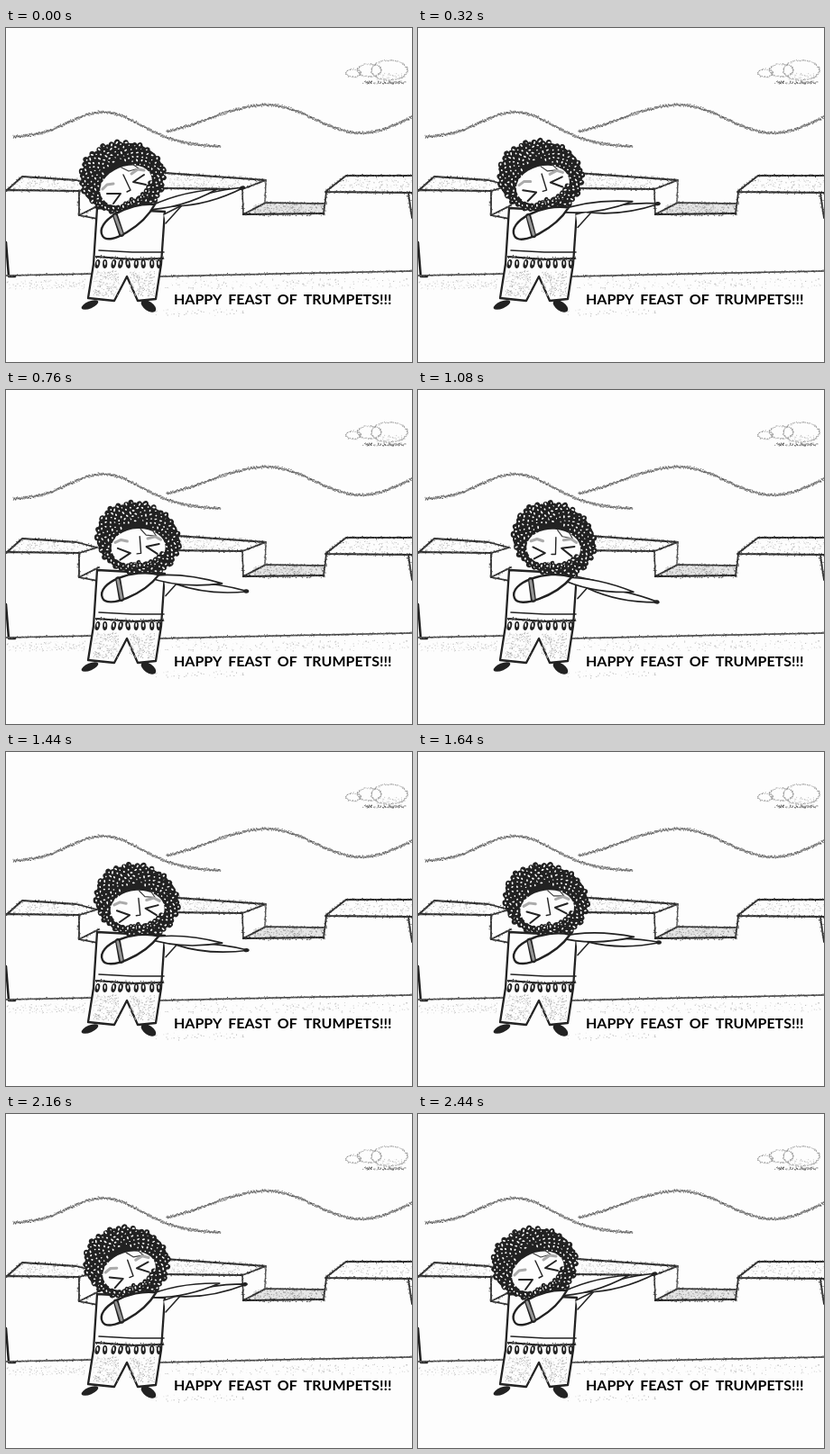
These frames come from a looping animation (450x371 px, 4360 ms). An HTML page with a canvas:

```html
<!DOCTYPE html>
<html lang="en">
<head>
<meta charset="utf-8">
<title>Happy Feast of Trumpets</title>
<style>
html, body { margin: 0; width: 100%; height: 100%; overflow: hidden; background: #fdfdfd; }
canvas { display: block; }
</style>
</head>
<body>
<canvas id="stage" width="450" height="371"></canvas>
<script>
const ctx = document.getElementById('stage').getContext('2d');
const PAPER = '#fdfdfd', DARK = '#222', TAU = Math.PI * 2;
const LOOP = 4360, STEP = 40, REST = 40, PEAK = 1000, END = 2440, SWING = 28;
let seed;

function rnd() {
  seed = (seed * 1664525 + 1013904223) >>> 0;
  return seed / 4294967296;
}
const spread = r => (rnd() - rnd()) * r;
const gray = v => `rgb(${v},${v},${v})`;

function speck(x, y, v) {
  ctx.fillStyle = gray(v + rnd() * 80 | 0);
  ctx.fillRect(x - .5, y - .5, 1, 1);
}

// Line through x,y pairs, optionally filled.
function ink(p, w = 1.6, v = 35, fill) {
  ctx.beginPath();
  for (let i = 0; i < p.length; i += 2) ctx.lineTo(p[i], p[i + 1]);
  if (fill) { ctx.fillStyle = fill; ctx.fill(); }
  ctx.lineWidth = w;
  ctx.strokeStyle = gray(v);
  ctx.stroke();
}

// Dark line with a rough edge.
function pencil(p, w = 2.2, v = 40) {
  ink(p, w * .8, v);
  for (let i = 2; i < p.length; i += 2) {
    const dx = p[i] - p[i - 2], dy = p[i + 1] - p[i - 1], n = Math.hypot(dx, dy);
    for (let j = 0; j < n; j++) {
      speck(p[i - 2] + dx * j / n + spread(w), p[i - 1] + dy * j / n + spread(w), v);
    }
  }
}

function ridge(x0, x1, height) {
  for (let x = x0; x < x1; x += .3) speck(x, height(x) + spread(2), 70);
}

function oval(x, y, rx, ry, a, fill) {
  ctx.beginPath();
  ctx.ellipse(x, y, rx, ry, a, 0, TAU);
  ctx.fillStyle = fill;
  ctx.fill();
}

// Grainy shading inside a box.
function shade(x, y, w, h, n, v = 170) {
  while (n--) speck(x + rnd() * w, y + rnd() * h, v);
}

// Leaf between two points; lead moves the fullest part, up and down set its sides.
function leaf(x1, y1, x2, y2, up, down, lead, w) {
  const n = Math.hypot(x2 - x1, y2 - y1);
  ctx.save();
  ctx.translate(x1, y1);
  ctx.rotate(Math.atan2(y2 - y1, x2 - x1));
  ctx.beginPath();
  ctx.moveTo(0, 0);
  ctx.bezierCurveTo(lead * n, -up, .65 * n, -up, n, 0);
  ctx.bezierCurveTo(.65 * n, down, lead * n, down, 0, 0);
  ctx.fillStyle = PAPER;
  ctx.fill();
  ctx.lineWidth = w;
  ctx.strokeStyle = DARK;
  ctx.stroke();
  ctx.restore();
}

function scenery() {
  ridge(8, 238, x => 122 + (x - 8) / 23 - 33 * Math.exp(-(((x - 110) / 57) ** 2)));
  ridge(178, 450, x => 101 - 15.5 * Math.cos((x - 290) / (x < 290 ? 42 : 33)));

  // cloud puffs with a shadow
  for (const [x, y, r] of [[385, 50, 8], [403, 47, 13], [425, 47, 20]]) {
    for (let a = 0; a < TAU; a += 1.2 / r) {
      speck(x + r * Math.cos(a) + spread(1), y + r * .55 * Math.sin(a) + spread(1), 120);
    }
  }
  shade(410, 50, 32, 8, 50);
  shade(395, 59, 48, 3, 90, 70);

  // parapets and the gap between them
  shade(12, 168, 72, 11, 130);
  shade(180, 166, 80, 11, 170);
  shade(368, 168, 82, 12, 130);
  ink([266, 205, 287, 195, 353, 195, 351, 205], 0, 225, '#e6e6e6');
  shade(275, 195, 77, 11, 200, 130);
  pencil([0, 181, 18, 165, 78, 169, 101, 175, 81, 181, 0, 180]);
  pencil([81, 181, 81, 208, 103, 197]);
  pencil([81, 208, 101, 212]);
  pencil([176, 161, 288, 169, 262, 179, 176, 178]);
  pencil([262, 179, 263, 207, 288, 194, 354, 195], 1.8);
  pencil([288, 169, 287, 194], 1.5, 70);
  pencil([263, 207, 352, 206], 2.8, 30);
  pencil([450, 164, 377, 164, 354, 182, 450, 183]);
  pencil([355, 182, 352, 207]);
  pencil([446, 184, 450, 211]);

  // ground
  ink([0, 238, 3, 276, 10, 276], 2.5, 30);
  pencil([0, 275, 96, 273], 1.8, 60);
  pencil([171, 276, 300, 273, 450, 270], 1.8, 60);
  shade(0, 279, 88, 11, 130);
  shade(172, 278, 278, 12, 230);
  shade(165, 312, 100, 8, 50);
}

function body() {
  ink([101, 200, 176, 204, 172, 262, 166, 301, 146, 303, 134, 276, 120, 303, 91, 300, 97, 262, 101, 200], 2.3, 35, PAPER);
  for (const x of [97, 137]) shade(x, 270, 28, 28, 170, 150);
  ink([103, 247, 140, 249, 175, 249]);
  pencil([100, 254, 140, 257, 174, 256], 2.8, 30);
  for (let i = 0; i < 9; i++) {
    const x = 102 + i * 8.5 + spread(1);
    oval(x, 262, 2.6, 5, spread(.3), DARK);
    oval(x, 261, .9, 2.5, 0, PAPER);
  }
  oval(93, 307.5, 10, 4, -.4, DARK);
  oval(158, 309, 9.5, 5, .6, DARK);
}

function curl(x, y, r) {
  oval(x, y, r, r * .85, rnd() * 3, DARK);
  oval(x + spread(1), y + spread(1), r * .4 * rnd() + .5, .9, rnd() * 3, PAPER);
}

function head() {
  oval(129, 166, 46, 38, -.2, DARK);
  for (let i = 50; i < 250; i++) {
    const r = Math.sqrt(i / 250), a = i * 2.4;
    curl(129 + 47 * r * Math.cos(a), 166 + 39.5 * r * Math.sin(a), 3.6);
  }
  oval(133, 175, 30, 21, -.4, PAPER);

  // beard and moustache
  for (let i = 0; i < 14; i++) {
    const a = .1 + i * .2;
    curl(132 + 29 * Math.cos(a) - 4 * Math.sin(a), 178 + 21 * Math.sin(a) - 8 * Math.cos(a), 3.3);
    if (i < 8) curl(132 + i * 3.5, 194 - i + spread(2), 2.6);
  }

  ink([128, 155, 136, 159, 147, 156, 140, 151], 1.2, 60);
  ink([107, 179, 112, 174, 119, 173], 3, 170);
  ink([139, 162, 146, 157, 153, 158], 3, 170);
  ink([112, 184, 127, 184, 119, 195], 2);
  ink([153, 163, 141, 171, 155, 174], 2);
  ink([130, 163, 138, 180, 134, 182], 1.4);
}

function horn() {
  leaf(186, 198, 264, 177, 5, 6, .3, 1.7);
  leaf(152, 202, 234, 179, 6, 7, .3, 1.7);
  oval(262, 177.5, 3, 2.2, -.3, DARK);
}

function sleeve() {
  leaf(107, 231, 165, 196, 18, 14, 0, 2.4);
  ink([121, 208, 128, 229], 6, 35);
  ink([121, 209, 128, 228], 3, 150);
}

function turned(x, y, deg, paint) {
  ctx.save();
  ctx.translate(x, y);
  ctx.rotate(deg * Math.PI / 180);
  ctx.translate(-x, -y);
  paint();
  ctx.restore();
}

// Steady swing down to the peak, slower steady return, then rest.
const tilt = t => SWING * Math.max(0, Math.min((t - REST) / (PEAK - REST), (END - t) / (END - PEAK)));

function draw(angle) {
  seed = 7;
  ctx.fillStyle = PAPER;
  ctx.fillRect(0, 0, 450, 371);
  ctx.lineJoin = ctx.lineCap = 'round';
  scenery();
  body();
  turned(140, 212, angle, head);
  // far arm reaches up to the horn
  const reach = angle * .55;
  ink([175, 207, 195, 197 + reach, 177, 217 + reach], 1.6, 40, PAPER);
  turned(140, 212, angle, horn);
  turned(108, 230, angle * .42, sleeve);
  ctx.fillStyle = '#000';
  ctx.font = 'bold 16px Lato, sans-serif';
  ctx.wordSpacing = '3px';
  ctx.fillText('HAPPY FEAST OF TRUMPETS!!!', 186, 307);
}

const start = performance.now();
let last;
function frame() {
  const t = Math.floor((performance.now() - start) % LOOP / STEP) * STEP;
  const angle = tilt(t);
  if (angle !== last) draw(last = angle);
  requestAnimationFrame(frame);
}
frame();
</script>
</body>
</html>
```
